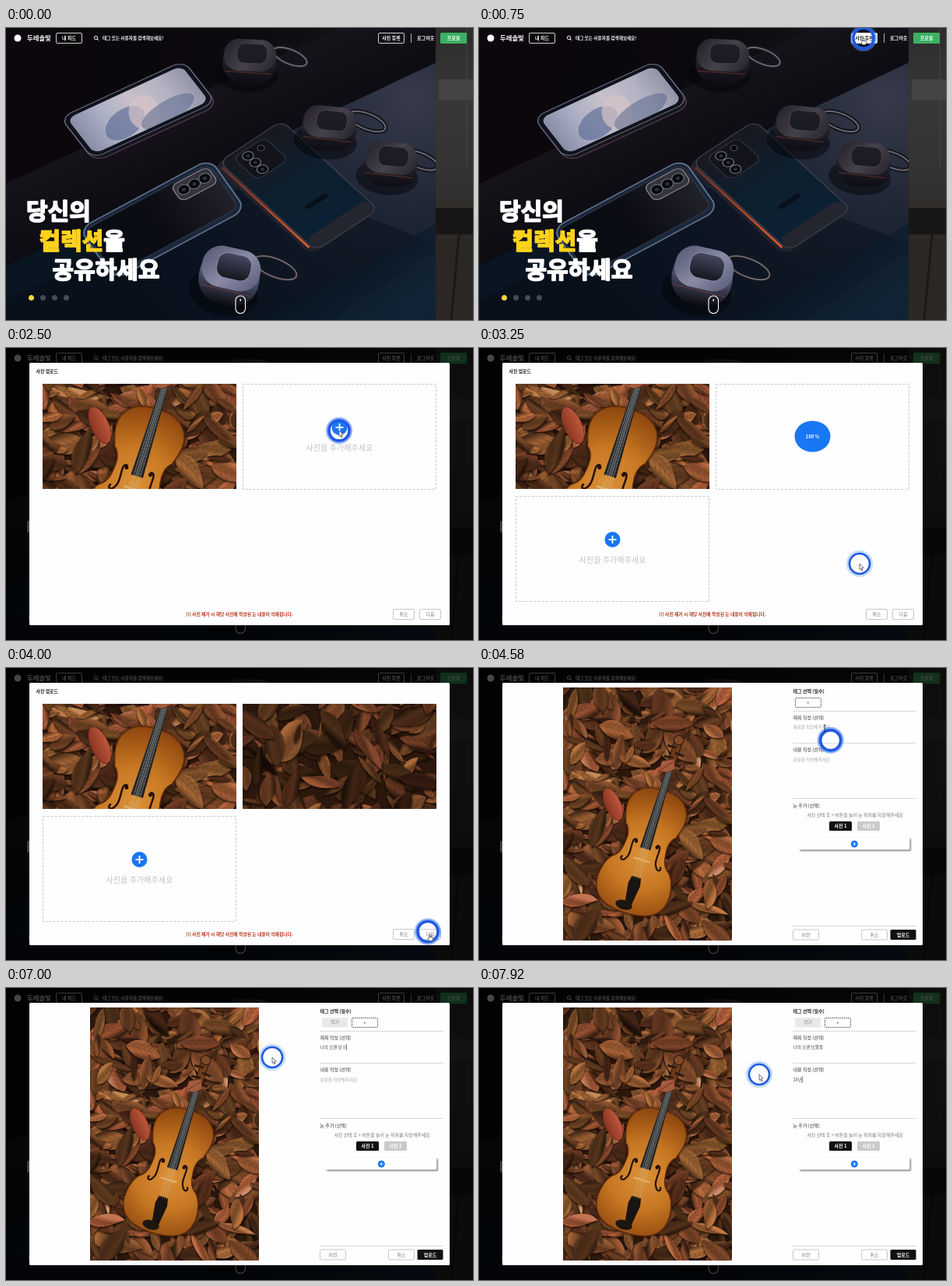
Animation of 600x375 px, one loop 8 s. Source, as an HTML page with a canvas:

```html
<!DOCTYPE html>
<html lang="ko">
<head>
<meta charset="utf-8">
<title>사진 업로드</title>
<style>
html, body { margin: 0; width: 100%; height: 100%; overflow: hidden; background: #000; }
canvas { display: block; width: 600px; height: 375px; }
</style>
</head>
<body>
<canvas id="stage"></canvas>
<script>
const W = 600, H = 375, LOOP = 8000, K = 2;
const FONT = '"Noto Sans CJK KR", "Noto Sans CJK", sans-serif';
const BLUE = '#1877f2', INK = '#111114', GREY = '#777', EDGE = '#b8b8bc';
const stage = document.getElementById('stage');
const dpr = window.devicePixelRatio || 1;
stage.width = W * dpr;
stage.height = H * dpr;
const main = stage.getContext('2d');
let g = main;

// ---------- helpers ----------
function text(s, x, cy, size, color, weight = 500, align = 'left') {
  g.font = `${weight} ${size}px ${FONT}`;
  g.textAlign = align;
  g.fillStyle = color;
  g.fillText(s, x, cy + size * 0.37);
}
function paint(fill, stroke, width = 1) {
  if (fill) { g.fillStyle = fill; g.fill(); }
  if (stroke) { g.strokeStyle = stroke; g.lineWidth = width; g.stroke(); }
}
function box(x, y, w, h, r, fill, stroke, width) {
  g.beginPath();
  g.roundRect(x, y, w, h, r);
  paint(fill, stroke, width);
}
function oval(x, y, rx, ry, fill, stroke, width, rot = 0) {
  g.beginPath();
  g.ellipse(x, y, rx, ry, rot, 0, 7);
  paint(fill, stroke, width);
}
function line(x1, y1, x2, y2, color, width = 1) {
  g.beginPath();
  g.moveTo(x1, y1);
  g.lineTo(x2, y2);
  paint(null, color, width);
}
function shape(d, fill, stroke, width = 1) {
  const p = new Path2D(d);
  if (fill) { g.fillStyle = fill; g.fill(p); }
  if (stroke) { g.strokeStyle = stroke; g.lineWidth = width; g.stroke(p); }
}
function stops(gradient, colors) {
  colors.forEach((c, i) => gradient.addColorStop(i / (colors.length - 1), c));
  return gradient;
}
const ramp = (x1, y1, x2, y2, ...colors) => stops(g.createLinearGradient(x1, y1, x2, y2), colors);
const glow = (x, y, r, ...colors) => stops(g.createRadialGradient(x, y, 0, x, y, r), colors);
function within(setup, draw) {
  g.save();
  setup();
  draw();
  g.restore();
}
const placed = (x, y, rot, draw) => within(() => { g.translate(x, y); g.rotate(rot); }, draw);
function cached(w, h, draw) {
  const c = document.createElement('canvas');
  c.width = w * K;
  c.height = h * K;
  g = c.getContext('2d');
  g.scale(K, K);
  draw();
  g = main;
  return c;
}
function random(seed) {
  return () => (seed = (seed * 16807) % 2147483647) / 2147483647;
}

// ---------- hero picture ----------
// A phone lying in space: local 200 x 100, spanned by its long and short edges.
function phone(x, y, lx, ly, sx, sy, draw) {
  within(() => g.transform(lx / 200, ly / 200, sx / 100, sy / 100, x, y), draw);
}
function lenses(x, y, step, r) {
  for (let i = 0; i < 3; i++) {
    oval(x + i * step, y, r, r, '#07090f', '#77757f', 1.2);
    oval(x + i * step, y, r * 0.35, r * 0.35, '#2a3146');
  }
}
function clip(x, y, size) {
  oval(x, y, size, size * 0.4, null, '#16171e', 6, 0.38);
  oval(x, y, size, size * 0.4, null, '#6d6c77', 1.8, 0.38);
}
function pod(x, y, w, h, rot, top, side) {
  placed(x, y, rot, () => {
    oval(-3, h * 0.3, w * 0.58, h * 0.4, 'rgba(3,4,8,.5)');
    box(-w / 2, -h / 2 + 3, w, h - 3, h * 0.44, ramp(0, 0, 0, h / 2, side, '#0e0d14'));
    box(-w / 2 + 1, -h / 2, w - 2, h * 0.72, h * 0.34, ramp(-w / 2, -h / 2, w / 2, h / 3, side, top, side));
    box(-w * 0.24, -h * 0.4, w * 0.56, h * 0.44, h * 0.17, ramp(0, -h / 2, 0, 0, side, '#1a1b24'), top, 0.8);
    line(-w * 0.46, h * 0.24, w * 0.42, h * 0.26, 'rgba(180,80,55,.45)', 1);
  });
}
function headline(parts, x, cy) {
  for (const [s, color] of parts) {
    text(s, x, cy, 30, color, 900);
    g.lineJoin = 'round';
    g.strokeStyle = color;
    g.lineWidth = 1.7;
    g.strokeText(s, x, cy + 30 * 0.37);
    x += g.measureText(s).width;
  }
}
function drawHero() {
  g.fillStyle = ramp(0, 0, 500, 120, '#0b070c', '#0c090e', '#18151b');
  g.fillRect(0, 0, W, H);
  shape('M0 200L430 0H600V400H0Z', ramp(150, 130, 200, 240, '#17131a', '#0b0b12'));
  shape('M0 305L600 22V400H0Z', glow(520, 90, 460, '#373b4b', '#1e2534', '#101c2b', '#0a1522'));
  shape('M0 350L330 190L560 280L380 400H0Z', 'rgba(3,8,15,.35)');
  shape('M600 225L330 375H600Z', ramp(420, 260, 500, 375, 'rgba(7,14,24,.8)', 'rgba(16,40,60,.6)'));

  phone(70, 115, 158, -73, 42, 54, () => {
    box(0, 2, 200, 104, 20, '#17151e', '#4b3b47', 2);
    box(0, 0, 200, 98, 18, '#10121c', '#6c7288', 1.5);
    box(7, 7, 186, 84, 13, ramp(0, 0, 200, 0, '#8387a2', '#aaaec4', '#c9c1cb', '#b3b3c4', '#8f8fa3'));
    g.clip();
    oval(72, 62, 36, 24, 'rgba(84,101,145,.6)', null, 1, -0.5);
    oval(105, 58, 22, 34, 'rgba(214,196,200,.7)', null, 1, 0.4);
    oval(134, 76, 46, 20, 'rgba(92,104,140,.55)', null, 1, -0.2);
  });
  phone(262, 168, -168, 90, 46, 65, () => {
    box(0, 0, 200, 100, 18, 'rgba(30,42,62,.9)', '#64748f', 2);
    box(6, 6, 190, 86, 13, ramp(0, 0, 200, 0, '#23232b', '#0d0e15', '#080b13'), '#343f54', 1);
    box(9, 9, 56, 31, 9, '#34343e', '#9693a0', 1.2);
    lenses(21, 24, 16, 8);
  });
  phone(274, 172, 124, 114, 80, -53, () => {
    box(0, -9, 202, 109, 14, '#22222b');
    box(0, 0, 200, 100, 13, ramp(0, 0, 200, 0, '#191920', '#0d2030', '#0b2133'), '#3f404b', 1.5);
    box(176, 2, 23, 96, 10, '#24262f');
    line(10, -3, 190, -3, ramp(0, 0, 200, 0, '#5e2e2c', '#a84429', '#e06034'), 3);
    box(7, 17, 50, 50, 10, '#13141b', '#3a3b45', 1);
    lenses(17, 33, 15, 7);
    oval(18, 53, 4.5, 4.5, '#07090f', '#5d5c66', 1);
    box(132, 34, 8, 34, 4, '#07111b');
  });

  const dark = ['#46424c', '#211f28'];
  clip(365, 37, 23);
  pod(313, 43, 69, 57, 0.05, ...dark);
  clip(464, 120, 25);
  pod(415, 129, 70, 57, 0.1, ...dark);
  clip(532, 170, 24);
  pod(494, 175, 69, 57, 0.1, ...dark);
  clip(346, 308, 29);
  pod(287, 319, 78, 74, 0.22, '#8b8ba6', '#50536f');

  // edge of the next slide
  g.fillStyle = ramp(0, 0, 0, H, '#2d2d2d', '#393837', '#353331', '#2a2725', '#2b2826');
  g.fillRect(552, 0, 48, H);
  g.fillStyle = '#454443';
  g.fillRect(556, 66, 44, 26);
  line(592, 0, 592, 180, '#474442', 1);
  g.fillStyle = '#181617';
  g.fillRect(552, 231, 48, 34);
  line(582, 265, 572, 375, '#1b1918', 3);

  headline([['당신의', '#fff']], 26, 235.5);
  headline([['컬렉션', '#ffd21c'], ['을', '#fff']], 42.5, 273.5);
  headline([['공유하세요', '#fff']], 59.5, 310.5);
  for (let i = 0; i < 4; i++) oval(32.5 + i * 15, 346.5, 3.6, 3.6, i ? '#464b55' : '#ffd23c');
  box(295, 344, 12.5, 22.5, 6.2, 'rgba(0,0,0,.2)', '#fff', 1.1);
  line(301.2, 348, 301.2, 351, '#fff', 1.3);
}

// ---------- photos ----------
function leaves(seed, count, dim) {
  const rnd = random(seed);
  g.fillStyle = '#2c170d';
  g.fillRect(0, 0, 217, 325);
  for (let i = 0; i < count; i++) {
    const len = 10 + rnd() * 19, wide = len * (0.22 + rnd() * 0.45);
    const v = (0.4 + rnd() * 0.8) * dim, bend = (rnd() - 0.5) * len;
    const hue = 18 + rnd() * 10;
    const tone = k => `hsl(${hue} 50% ${40 * v * k}%)`;
    placed(rnd() * 227 - 5, rnd() * 335 - 5, rnd() * 7, () => {
      g.beginPath();
      g.moveTo(-len, 0);
      g.bezierCurveTo(-len * 0.4, -wide * 1.3, len * 0.4, -wide + bend, len, bend);
      g.bezierCurveTo(len * 0.5, wide * 0.6 + bend, -len * 0.3, wide * 1.3, -len, 0);
      g.shadowColor = 'rgba(15,5,0,.8)';
      g.shadowBlur = 5;
      g.shadowOffsetY = 3;
      paint(ramp(0, -wide, 0, wide, tone(1.3), tone(0.85), tone(1.05), tone(0.4)));
      g.shadowColor = 'transparent';
      g.beginPath();
      g.moveTo(-len, 0);
      g.quadraticCurveTo(0, -bend * 0.3, len, bend);
      for (let s = -0.6; s < 0.6; s += 0.3) {
        g.moveTo(len * (s + 0.3), -wide * 0.6);
        g.lineTo(len * s, 0);
        g.lineTo(len * (s + 0.3), wide * 0.5);
      }
      paint(null, 'rgba(70,32,14,.45)', 0.5);
    });
  }
}
function violin() {
  const half = 'M0-80C22-82 40-70 39-48C38-36 34-30 34-27C27-22 26-12 27-5C28 8 31 15 38 19C47 29 51 50 45 64C38 80 18 84 0 84';
  const wood = glow(0, 8, 88, '#dc9138', '#c67722', '#8d460f');
  const mirror = draw => [-1, 1].forEach(s => within(() => g.scale(s, 1), draw));
  mirror(() => {
    g.shadowColor = 'rgba(10,3,0,.8)';
    g.shadowBlur = 10;
    shape(half, wood);
  });
  mirror(() => {
    shape(half, wood, '#5f2b0b', 1.4);
    shape('M13-10C23-14 14 8 20 16C24 24 29 18 25 15', null, '#241006', 2.2);
    oval(14, -8, 2.3, 2.3, '#241006');
  });
  // scroll, neck, strings and fittings
  box(-5, -146, 10, 36, 2, '#6e3b1a', '#2c160b', 1);
  oval(0, -148, 6.5, 6, '#7c4826', '#321a0e', 1.2);
  for (let i = 0; i < 4; i++) line(0, i * 7 - 138, i % 2 ? 12 : -12, i * 7 - 137, '#2b1a12', 3);
  shape('M-4-114H4L7-2H-7Z', ramp(-7, 0, 7, 0, '#191a1c', '#42474a', '#141517'));
  shape('M-6 36H6L8 46L4 76H-4L-8 46Z', '#171412');
  oval(-5, 75, 11, 6, '#1d1611');
  for (let s = -1.5; s < 2; s++) line(s * 1.6, -112, s * 3, 38, 'rgba(205,200,185,.65)', 0.5);
  line(-11, 13, 11, 13, '#e0b071', 2.2);
}
const hero = cached(W, H, drawHero);
const photo1 = cached(217, 325, () => {
  leaves(4127, 560, 1);
  placed(64, 150, 1.15, () => oval(0, 0, 22, 10, ramp(0, -9, 0, 10, '#bd573c', '#8a3522'), '#5c2415', 0.6));
  placed(105, 209, 0.3, violin);
  placed(134, 101, -0.5, () => shape('M-13 0L-3-9L12-4L7 8L-4 7ZM-10 0L9-1', '#a55b3e', '#532a19', 0.6));
});
const photo2 = cached(217, 325, () => leaves(90217, 420, 0.75));

function cover(photo, x, y, w, h) {
  const sh = 217 * h / w;
  g.drawImage(photo, 0, (325 - sh) / 2 * K, 217 * K, sh * K, x, y, w, h);
}

// ---------- pages ----------
function button(label, x, y, w, h, fill, stroke, color, weight = 500) {
  box(x, y, w, h, 1.5, fill, stroke, 0.8);
  text(label, x + w / 2, y + h / 2, 6, color, weight, 'center');
}
const outlined = (label, x, y, w) => button(label, x, y, w, 13, '#fff', EDGE, GREY);
function plus(x, y, r) {
  oval(x, y, r, r, BLUE);
  line(x - r * 0.5, y, x + r * 0.5, y, '#fff', r * 0.19);
  line(x, y - r * 0.5, x, y + r * 0.5, '#fff', r * 0.19);
}
function dashed(dash, draw) {
  g.setLineDash(dash);
  draw();
  g.setLineDash([]);
}
function header(hover) {
  oval(15, 13, 4.5, 4.5, '#fff');
  text('두레솔빛', 27, 13, 8.4, '#fff', 700);
  button('내 피드', 64.5, 6.5, 33, 13, null, '#fff', '#fff', 700);
  oval(115.5, 12.5, 2.2, 2.2, null, '#fff', 1);
  line(117, 14, 119, 16, '#fff', 1);
  text('태그 또는 사용자를 검색해보세요!', 124, 13, 5.65, '#fff', 700);
  button('사진 등록', 478.5, 6.5, 33, 13, hover ? '#fff' : null, '#fff', hover ? '#222' : '#fff', 700);
  line(520.5, 7, 520.5, 19, '#ddd', 0.8);
  text('로그아웃', 528, 13, 6.1, '#fff', 700);
  button('프로필', 558, 6, 34, 14, '#3bb163', null, '#fff', 700);
}
function emptySlot(x, y, inner) {
  dashed([3, 2], () => box(x + 0.5, y + 0.5, 248, 135, 0, null, '#c6c6ca', 1));
  inner(x + 124.5, y);
}
function addPrompt(cx, y) {
  plus(cx, y + 56, 10);
  text('사진을 추가해주세요', cx, y + 82, 10.1, '#c3c3c7', 400, 'center');
}
function slot(t, x, y, start, done, photo) {
  if (t >= done) return cover(photo, x, y, 249, 135);
  emptySlot(x, y, t < start ? addPrompt : (cx, top) => {
    const k = Math.min(1, Math.max(0, (t - start - 200) / (done - start - 420)));
    oval(cx, top + 67.5, 23, 20, BLUE);
    text(Math.round(k * 100) + ' %', cx, top + 67.5, 6, '#fff', 700, 'center');
  });
}
function uploadPage(t) {
  text('사진 업로드', 38.5, 29.5, 5.9, '#222', 700);
  slot(t, 47, 46, 1520, 2300, photo1);
  if (t >= 1520) slot(t, 304, 46, 2560, 3390, photo2);
  if (t >= 2560) emptySlot(47, 190, addPrompt);
  text('(!) 사진 제거 시 해당 사진에 작성된 눈 내용이 삭제됩니다.', 300, 342, 5.8, '#b5381b', 700, 'center');
  outlined('취소', 497.5, 335.5, 27);
  outlined('다음', 531.5, 335.5, 27);
}

// Every keystroke's text while Hangul syllables are composed: lead, vowel, tail.
function keystrokes(s) {
  const keys = [''];
  [...s].forEach((ch, i) => {
    const done = s.slice(0, i), c = ch.charCodeAt(0) - 0xAC00;
    if (c >= 0) {
      keys.push(done + 'ㄱㄲㄴㄷㄸㄹㅁㅂㅃㅅㅆㅇㅈㅉㅊㅋㅌㅍㅎ'[Math.floor(c / 588)]);
      if (c % 28) keys.push(done + String.fromCharCode(0xAC00 + c - c % 28));
    }
    keys.push(done + ch);
  });
  return keys;
}
const TAG = keystrokes('악기'), TITLE = keystrokes('나의 오랜 보물들'), BODY = keystrokes('10년');
const typed = (keys, t, start) =>
  keys[Math.min(keys.length - 1, Math.max(0, Math.floor((t - start) / 70) + 1))];

function field(label, value, hint, y, focus) {
  text(label, 403.5, y, 6, '#333');
  const cy = y + 12.5;
  text(value || hint, 403.5, cy, 5.6, value ? '#444' : '#aaa', 400);
  const x = 404 + (value ? g.measureText(value).width : 0);
  if (focus) line(x, cy - 4, x, cy + 4, '#333', 0.7);
}
const rule = y => line(403, y, 562, y, '#d6d6da', 0.9);
function formPage(t) {
  g.drawImage(photo1, 108, 25, 217, 325);
  text('태그 선택 (필수)', 403.5, 29.5, 6, '#222', 700);
  const tagged = t >= 5420, x = tagged ? 444 : 406;
  if (tagged) button('악기', 406, 38, 33, 12.5, '#e9e9eb', null, GREY);
  dashed([1.6, 1], () => box(x + 0.5, 38.5, 33, 12, 1, '#fff', '#444', 0.9));
  text((!tagged && typed(TAG, t, 4960)) || '+', x + 17, 44.5, 6, '#333', 500, 'center');
  rule(55.5);
  field('제목 작성 (선택)', typed(TITLE, t, 6030), '제목을 작성해주세요', 63.5, t >= 5700 && t < 7520);
  rule(96.5);
  field('내용 작성 (선택)', typed(BODY, t, 7570), '내용을 작성해주세요', 105, t >= 7520);
  rule(167.5);
  text('눈 추가 (선택)', 403.5, 176.5, 6, '#333');
  text('사진 선택 후 + 버튼을 눌러 눈 위치를 지정해주세요', 483, 189, 5.95, GREY, 400, 'center');
  button('사진 1', 450, 197, 29, 12, INK, null, '#fff', 700);
  button('사진 2', 486, 197, 29, 12, '#cacacc', null, '#fff', 700);
  within(() => {
    g.shadowColor = 'rgba(0,0,0,.6)';
    g.shadowBlur = 2 * dpr;
    g.shadowOffsetX = g.shadowOffsetY = 1.2 * dpr;
  }, () => box(411, 218, 142.5, 15.5, 1, '#fff'));
  plus(482.3, 226, 4.5);
  rule(331.5);
  outlined('이전', 403.5, 336, 33);
  outlined('취소', 491.5, 336, 33);
  button('업로드', 528.5, 336, 33, 13, INK, null, '#fff', 700);
}

// ---------- pointer ----------
// Stops of the pointer: arrival time, place, and whether it clicks there.
const STOPS = [
  [0, 560, -40], [620, 494, 13, true], [1380, 207, 102, true], [1780, 207, 165],
  [2330, 428, 106, true], [3120, 489, 277], [3950, 545, 342, true], [4530, 448, 83, true],
  [4780, 423, 45, true], [5600, 436, 78, true], [5960, 342, 89], [7390, 430, 117, true], [7800, 360, 111]
];
function at(t) {
  let [, x, y] = STOPS[0];
  for (const [end, tx, ty] of STOPS) {
    const time = 250 + 0.3 * Math.hypot(tx - x, ty - y);
    const u = Math.min(1, Math.max(0, (t - end) / time + 1)), e = u * u * (3 - 2 * u);
    x += (tx - x) * e;
    y += (ty - y) * e;
    if (u < 1) break;
  }
  return [x, y];
}
function pointer(t) {
  const [x, y] = at(t), [rx, ry] = at(t - 90);
  const press = STOPS.some(([end, , , click]) => click && t > end + 20 && t < end + 200);
  oval(rx, ry, 14.5, 14.5, null, press ? 'rgba(70,130,245,.6)' : 'rgba(110,175,225,.42)', 5);
  oval(rx, ry, 13, 13, null, '#2159e3', press ? 3.6 : 2.6);
  const form = t >= 4210;
  const beam = form && x > 402 && x < 562 && ((y > 68 && y < 92) || (y > 111 && y < 160));
  const hand = t < 870 || (form ? y < 52 : y > 335);
  placed(x, y, 0, () => {
    if (beam) {
      shape('M0-4V4M-1.5-4H1.5M-1.5 4H1.5', null, '#333', 0.9);
    } else if (hand) {
      box(-1, 0, 2, 6, 1, '#fff', '#333', 0.7);
      box(-2.5, 3.5, 6, 5, 1.5, '#fff', '#333', 0.7);
    } else {
      shape('M0 0L5 5.2L2.8 5.5L4 8.3L2.7 8.8L1.6 6L0 7.4Z', '#fff', '#4b4b55', 0.8);
    }
  });
}

function frame() {
  const t = performance.now() % LOOP;
  g.setTransform(dpr, 0, 0, dpr, 0, 0);
  g.drawImage(hero, 0, 0, W, H);
  header(t > 500 && t < 800);
  if (t >= 800) {
    g.fillStyle = 'rgba(0,0,0,.72)';
    g.fillRect(0, 0, W, H);
    box(30, 19, 540, 337, 1.5, '#fefdff');
    (t < 4210 ? uploadPage : formPage)(t);
  }
  pointer(t);
  requestAnimationFrame(frame);
}
frame();
</script>
</body>
</html>
```
